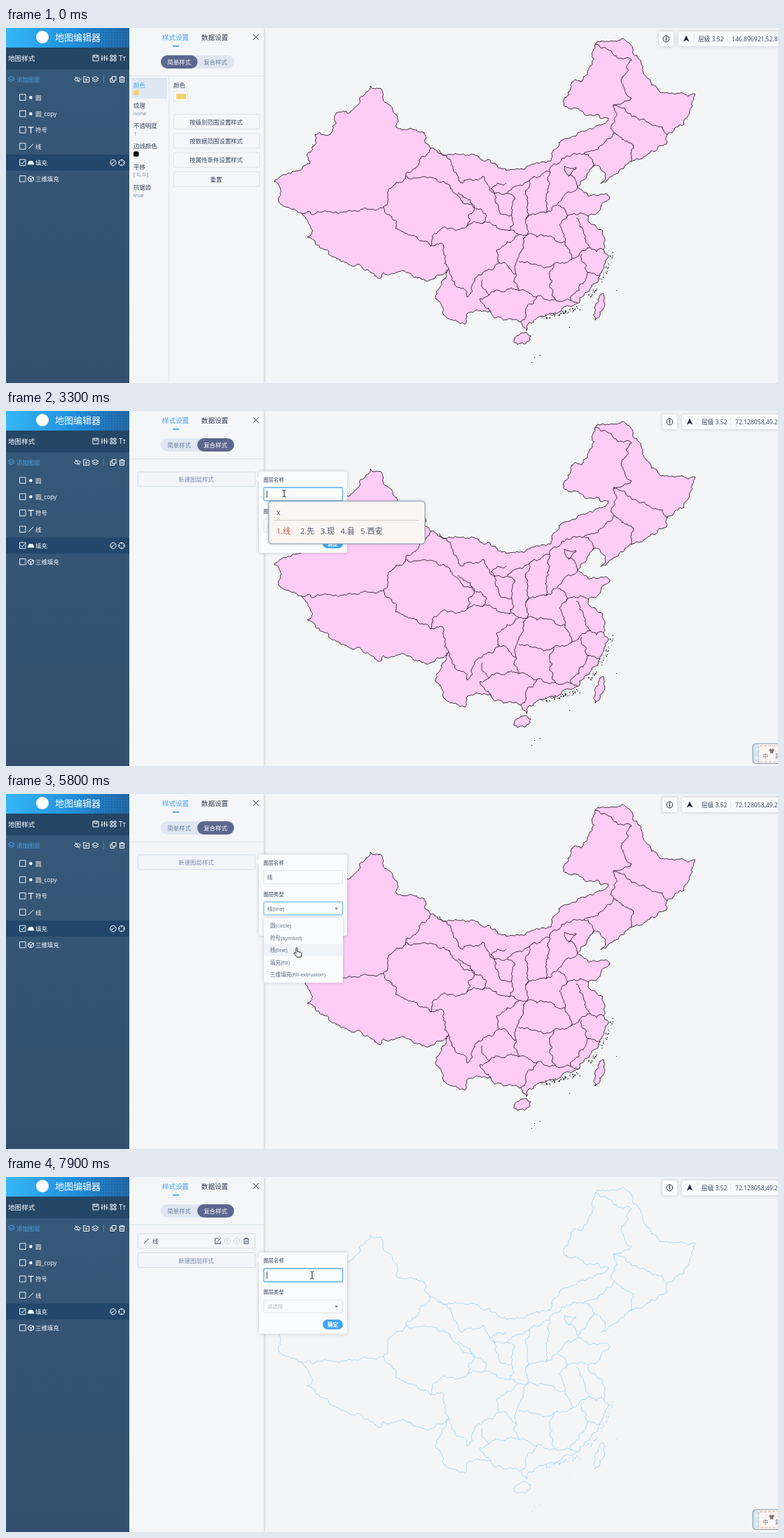
These frames come from a looping animation (1102 by 508 pixels, 8000 ms). An HTML page with a canvas:

```html
<!DOCTYPE html>
<html lang="zh">
<head>
<meta charset="utf-8">
<style>
html, body { margin: 0; width: 100%; height: 100%; overflow: hidden; background: #f4f5f7; }
canvas { display: block; width: 1102px; height: 508px; }
</style>
</head>
<body>
<canvas id="stage" width="1102" height="508"></canvas>
<script>
const c = document.getElementById('stage').getContext('2d');
const FONT = '"Open Sans", "Noto Sans CJK SC", "Noto Sans CJK", sans-serif';
const BLUE = '#42a5f0', INK = '#34435a', SOFT = '#6f7f9f', RULE = '#dbe4ec', PAPER = '#f4f6f9';
const clamp = v => Math.max(0, Math.min(1, v));
const ramp = (t, a, b) => clamp((t - a) / (b - a));

// ---------- map geometry ----------
let seed = 11;
const rand = () => (seed = (seed * 16807) % 2147483647) / 2147483647;

const COAST = [
  383,220, 407,208, 434,194, 437,170, 441,152, 464,150, 472,121, 489,122, 511,96, 520,83, 552,116, 556,140,
  598,153, 606,172, 636,181, 690,188, 714,204, 778,190, 789,164, 821,148, 860,129, 795,105, 807,78, 822,77,
  841,23, 879,15, 903,44, 918,73, 945,93, 983,94, 968,138, 944,152, 943,166, 925,177, 893,191, 849,223,
  855,207, 848,199, 837,199, 816,227, 862,242, 831,269, 855,305, 853,317, 860,327, 848,355, 836,368, 816,394,
  770,412, 746,422, 743,433, 735,420, 710,418, 692,406, 658,409, 655,424, 628,413, 617,390, 632,345, 607,360,
  539,350, 535,358, 494,341, 455,317, 430,299, 438,290, 422,265, 390,242
];
const NORTH = [
  [422,265, 482,263, 539,256],
  [606,172, 573,206, 547,230, 539,256, 556,287, 589,303, 606,312],
  [571,212, 632,224, 668,254, 658,283, 612,294, 606,312, 624,310, 632,345],
  [619,175, 638,199, 652,222, 680,212, 700,236, 726,242, 722,268, 703,258, 692,230, 714,222],
  [645,236, 686,268, 680,280],
  [716,236, 748,217, 776,205, 800,183, 825,180, 868,150],
  [658,283, 680,280, 718,290, 744,296, 742,274],
  [748,217, 742,274, 772,264, 773,230, 776,205],
  [841,23, 874,44, 893,46, 878,74, 893,100, 867,110, 868,150, 893,165, 893,191],
  [867,110, 903,131, 944,152],
  [825,180, 837,199],
  [718,290, 722,268],
  [816,227, 797,198, 814,200, 803,213]
];
const SOUTH = [
  [772,264, 793,246, 816,227],
  [788,254, 800,272, 831,269],
  [744,296, 798,306, 790,282, 800,272],
  [814,272, 826,296, 834,314, 853,317],
  [798,306, 806,332, 834,314],
  [822,324, 832,350, 848,355],
  [832,350, 806,390, 816,394],
  [806,332, 782,338, 776,352, 784,388, 806,390],
  [732,334, 760,340, 782,338],
  [744,296, 732,324, 728,352, 704,336],
  [732,296, 700,318, 704,336, 680,352, 658,385, 632,345],
  [680,360, 690,382, 732,376, 728,352],
  [690,382, 676,388, 692,406],
  [732,376, 758,384, 735,420],
  [758,384, 784,388]
];

// Roughens a straight segment by seeded midpoint displacement.
function rough(path, x0, y0, x1, y1) {
  const dx = x1 - x0, dy = y1 - y0, len = Math.hypot(dx, dy);
  if (len < 3) return path.lineTo(x1, y1);
  const k = (rand() - .5) * (len > 25 ? .22 : .5);
  const mx = (x0 + x1) / 2 - dy * k, my = (y0 + y1) / 2 + dx * k;
  rough(path, x0, y0, mx, my);
  rough(path, mx, my, x1, y1);
}
function trace(path, pts) {
  path.moveTo(pts[0], pts[1]);
  for (let i = 2; i < pts.length; i += 2) rough(path, pts[i - 2], pts[i - 1], pts[i], pts[i + 1]);
}
function island(path, x, y, rx, ry, tilt) {
  const pts = [];
  for (let i = 0; i <= 8; i++) {
    const a = i * Math.PI / 4, u = rx * Math.cos(a), v = ry * Math.sin(a);
    pts.push(x + u * Math.cos(tilt) - v * Math.sin(tilt), y + u * Math.sin(tilt) + v * Math.cos(tilt));
  }
  trace(path, pts);
}
const land = new Path2D(), inner = new Path2D(), specks = [];
trace(land, COAST.concat(COAST.slice(0, 2)));
island(land, 737, 445, 13, 8, -.35);
island(land, 847, 399, 6, 20, .3);
[...NORTH, ...SOUTH].forEach(b => trace(inner, b));
for (let i = 0; i < 85; i++) {
  const k = rand(), east = k < .5;
  const x = east ? 830 + 30 * Math.sin(k * 3.1) : 760 + 110 * (k - .5);
  const y = east ? 382 - 126 * k : 414 - 30 * (k - .5);
  specks.push([x + rand() * 6, y + rand() * 6 - 2, .6 + rand() * 1.2]);
}
specks.push([750, 478, 1], [754, 471, 1], [762, 468, 1], [871, 375, 1], [804, 428, 1]);

function drawMap(lines) {
  const color = lines ? '#a4daf5' : '#171018';
  if (!lines) { c.fillStyle = '#ffccf5'; c.fill(land); }
  c.strokeStyle = color;
  c.lineWidth = lines ? 1 : .85;
  c.lineJoin = 'round';
  c.stroke(land);
  c.stroke(inner);
  c.fillStyle = color;
  specks.forEach(([x, y, s]) => c.fillRect(x, y, s, s));
}

// ---------- drawing helpers ----------
function text(s, x, y, size = 8.45, color = INK, align = 'left', weight = 400) {
  c.font = `${weight} ${size}px ${FONT}`;
  c.fillStyle = color;
  c.textAlign = align;
  c.fillText(s, x, y + size * .36);
}
function rect(x, y, w, h, fill, stroke, r = 0, lw = 1) {
  c.beginPath();
  c.roundRect(x, y, w, h, r);
  if (fill) { c.fillStyle = fill; c.fill(); }
  if (stroke) { c.strokeStyle = stroke; c.lineWidth = lw; c.stroke(); }
}
function disc(x, y, r, fill, stroke) {
  rect(x - r, y - r, 2 * r, 2 * r, fill, stroke, r);
}
function icon(d, x, y, color = '#fff', fill, lw = 1) {
  const p = new Path2D(d);
  c.save();
  c.translate(x, y);
  c.lineWidth = lw;
  c.strokeStyle = color;
  if (fill) { c.fillStyle = fill; c.fill(p); }
  c.stroke(p);
  c.restore();
}
function card(x, y, w, h, r = 2) {
  c.save();
  c.shadowColor = 'rgba(50,60,80,.28)';
  c.shadowBlur = 5;
  rect(x, y, w, h, '#fafbfc', null, r);
  c.restore();
}

const square = (x, y, s) => `M${x} ${y}h${s}v${s}h${-s}z`;
const SAVE = square(-4, -4, 8) + 'M-2-4v3h4v-3';
const SLIDERS = [-3.5, 0, 3.5].map((x, i) => `M${x}-4v8M${x - 1.5} ${i % 2 ? -1 : 1}h3`).join('');
const GRID = [-4, 1].map(x => square(x, -4, 3) + square(x, 1, 3)).join('');
const LAYERS = 'M0-4l4.5 2.5l-4.5 2.5l-4.5-2.5zM-4.5 1l4.5 2.7l4.5-2.7';
const EYE = 'M-4.5 0q4.5-5 9 0q-4.5 5-9 0M-3-4l6 8';
const FOLDER = 'M-4-4h3l1 1h4v7h-8zM-2 .5h4m-2-2v4';
const COPY = square(-1.5, -4, 5.5) + 'M-1.5-1.5H-4V4h5.5v-2.5';
const TRASH = 'M-4-2.7h8m-5.5 0v-1.3h3v1.3M-3-2.7v6.7h6v-6.7M-1-.7v3m2 0v-3';
const CUBE = 'M0-4l4 2v4l-4 2l-4-2v-4zM-4-2l4 2l4-2M0 0v4';
const EDIT = 'M1-3.5h-5v7.5h7.7v-4M-1 1l5-5';
const SLASH = 'M-3.5 3.5l7-7';
const CURSORS = {
  arrow: 'M0 0v14l3.3-3l2.2 5l2.5-1l-2.2-5h4.2z',
  hand: 'M0 0q1.2-1.2 2 .3v4.7l5 1.3q1.4.7 1 2.7l-1 4h-5.8l-4.2-5.2q.4-1.8 1.7-1l1.3 1.2z',
  beam: 'M-2.5-5q2.5 0 2.5 1q0-1 2.5-1M0-4v8M-2.5 5q2.5 0 2.5-1q0 1 2.5 1'
};

// ---------- fixed interface ----------
function drawSidebar() {
  let g = c.createLinearGradient(0, 59, 0, 508);
  g.addColorStop(0, '#365878');
  g.addColorStop(1, '#334f6d');
  rect(0, 0, 176, 508, g);
  g = c.createLinearGradient(0, 0, 176, 8);
  g.addColorStop(0, '#36b7f9');
  g.addColorStop(.55, '#218fdc');
  g.addColorStop(1, '#2469a6');
  rect(0, 0, 176, 28, g);
  c.fillStyle = 'rgba(10,50,110,.3)';
  for (let y = 2; y < 28; y += 4)
    for (let x = 100 + y; x < 176; x += 4) c.fillRect(x, y, 1.6, 1.6);
  disc(52, 13, 9, '#fff');
  text('地图编辑器', 70, 13.5, 13, '#fff');

  rect(0, 28, 176, 31, '#254665');
  text('地图样式', 3, 43.5, 9.6, '#fff');
  [SAVE, SLIDERS, GRID].forEach((d, i) => icon(d, 128 + i * 12.5, 43));
  text('Tт', 161, 43.5, 10, '#fff');

  icon(LAYERS, 7.5, 73, BLUE);
  text('添加图层', 15, 74, 8.45, BLUE);
  [EYE, FOLDER, LAYERS].forEach((d, i) => icon(d, 102 + i * 12.7, 73.5));
  rect(139, 68, .7, 11, '#7b91a8');
  icon(COPY, 153, 73.5);
  icon(TRASH, 165.5, 73.5);

  rect(0, 181, 176, 23, '#22476b');
  ['圆', '圆_copy', '符号', '线', '填充', '三维填充'].forEach((name, i) => {
    const y = 99.5 + i * 23.3;
    rect(19.5, y - 4.5, 8.5, 8.5, null, '#e8eef4');
    text(name, 42, y + .3, 8.45, '#fff');
    if (i < 2) disc(35.3, y, 2.3, '#fff');
    if (i === 2) icon('M-4-4h8m-4 0v8.5', 35.5, y, '#fff', null, 1.3);
    if (i === 3) icon(SLASH, 35.5, y);
    if (i === 4) {
      icon('M-2.5-2h5l1.8 4.3h-8.6z', 35.5, y, '#fff', '#fff');
      icon('M-2.5 0l2 2l3.5-4.5', 23.7, y - .3);
      disc(153, y, 4.2, null, '#fff');
      icon('M-2 2l4-4M-2 2v-2', 153, y);
      disc(165, y, 4.2, null, '#fff');
      icon('M-4 0h2m4 0h2M0-4v2m0 4v2', 165, y);
    }
    if (i === 5) icon(CUBE, 35.5, y);
  });
}

function drawToolbar(lng, lat) {
  const dx = lng < 100 ? 5 : 0;
  card(932 + dx, 5, 21, 21);
  disc(942.3 + dx, 15.5, 4.4, null, '#222');
  text('i', 942.3 + dx, 15.5, 8, '#222', 'center', 700);
  card(960 + dx, 5, 160, 21);
  icon('M0-4l3.7 8l-3.7-2l-3.7 2z', 971 + dx, 15, '#1c2430', '#1c2430', .5);
  rect(981.5 + dx, 9, .8, 12, '#dde1e6');
  text('层级 3.52', 988 + dx, 15.5, 8.6);
  rect(1029 + dx, 9, .8, 12, '#dde1e6');
  text(`${lng.toFixed(6)},${lat.toFixed(6)}`, 1036 + dx, 15.5, 8.6);
}

function drawPanel(t) {
  c.save();
  c.shadowColor = 'rgba(60,70,80,.4)';
  c.shadowBlur = 4;
  rect(176, 0, 192, 508, PAPER);
  c.restore();
  text('样式设置', 242, 13.5, 9.6, BLUE, 'center');
  rect(238, 25, 9, 1.8, BLUE);
  text('数据设置', 298, 13.5, 9.6, '#2c3a4d', 'center');
  icon('M-4-4l8 8m0-8l-8 8', 356.7, 13, '#1e2632');
  const complex = t >= 1400;
  rect(221, 39, 105, 19, '#dfe6f2', null, 9.5);
  rect(complex ? 273 : 221, 39, 52.5, 19, '#5c678f', null, 9.5);
  text('简单样式', 247, 48.7, 8.45, complex ? SOFT : '#fff', 'center');
  text('复合样式', 299, 48.7, 8.45, complex ? '#fff' : SOFT, 'center');
  rect(176, 68, 192, 1, RULE);
  if (complex) drawComplex(t); else drawSimple();
}

function drawSimple() {
  rect(232, 69, 1, 439, RULE);
  rect(179, 71, 51, 30, '#dfe7f3');
  [['颜色'], ['纹理', 'none'], ['不透明度', '1'], ['边线颜色'], ['平移', '[ 0, 0 ]'], ['抗锯齿', 'true']]
    .forEach(([name, value], i) => {
      const y = 81.5 + i * 29.3;
      text(name, 182, y, 8.45, i ? INK : BLUE);
      if (value) text(value, 182, y + 11, 7.6, SOFT);
    });
  rect(182, 88.5, 7.5, 7.5, '#f4d06f', null, 2);
  rect(182, 176.5, 7.5, 7.5, '#000', null, 2);
  text('颜色', 239, 81.5);
  rect(239.5, 90.5, 20, 14, '#fff', '#dce3ea', 1);
  rect(243, 94, 14, 8, '#f4d06f');
  ['按级别范围设置样式', '按数据范围设置样式', '按属性条件设置样式', '重置'].forEach((name, i) => {
    const y = 123.5 + i * 27.4;
    rect(239.5, y, 122, 21, '#f5f7fa', RULE, 1);
    text(name, 300, y + 11, 8.45, INK, 'center');
  });
}

function drawComplex(t) {
  const added = t >= 6500, y = added ? 108.5 : 87;
  if (added) {
    rect(188.5, 81, 167, 21, PAPER, '#d5dfea', 1);
    icon(SLASH, 200.5, 91.5, '#465670');
    text('线', 209, 92);
    icon(EDIT, 302.5, 91.5, '#465670');
    [-1, 1].forEach(dir => {
      const x = 322.8 + dir * 6.8;
      disc(x, 91.5, 4.2, null, '#cfd6df');
      icon(`M0-2v4M-2 0L0 ${2 * dir}L2 0`, x, 91.5, '#cfd6df');
    });
    icon(TRASH, 343, 91.5, '#465670');
  }
  const hover = (t >= 1700 && t < 2200) || (t >= 7000 && t < 7500);
  rect(188.5, y, 167, 21, hover ? '#edf5fd' : '#f3f5fa', hover ? '#8ec8f6' : '#d3dcea', 1);
  text('新建图层样式', 271.5, y + 11, 8.45, hover ? BLUE : '#7b8ab0', 'center');
}

// ---------- layer dialog ----------
function dialogAlpha(t) {
  if (t < 6500) return ramp(t, 1900, 2200);
  return t < 7200 ? .88 * (1 - ramp(t, 6500, 6700)) : ramp(t, 7200, 7500);
}

function drawDialog(t) {
  const alpha = dialogAlpha(t);
  if (!alpha) return;
  const fresh = t >= 7200;
  const focused = (t >= 2500 && t < 4600) || t >= 7700;
  const named = t >= 3800 && !fresh;
  const selected = t >= 5800 && !fresh;
  const active = t >= 4600 && !fresh;
  const caret = focused && !(t >= 3000 && t < 3300);
  const open = ramp(t, 4600, 5000) * (1 - ramp(t, 5800, 6100));
  c.save();
  c.globalAlpha = alpha;
  c.translate(0, t >= 6500 ? 21.5 : 0);
  card(361, 86.5, 126, 116.5, 3);
  icon('M0-4l-3.5 4l3.5 4z', 361, 97, '#fafbfc', '#fafbfc', .3);
  text('图层名称', 367.5, 98, 7.3);
  rect(368, 109.5, 112.5, 19, '#fafbfc', focused ? '#58aef3' : '#dfe3e8', 1.5, focused ? 1.3 : 1);
  if (named) text('线', 372.5, 119.3, 8, '#596579');
  if (caret) rect(named ? 380 : 372, 114, .9, 10, '#333');
  text('图层类型', 367.5, 143, 7.3);
  rect(368, 154.5, 112.5, 18.5, '#fafbfc', active ? '#58aef3' : '#dfe3e8', 1.5);
  text(selected ? '线(line)' : '请选择', 373, 164, 7.4, selected ? '#596579' : '#b9bec6');
  icon(active && !selected ? 'M-2 1h4l-2-2.2z' : 'M-2-1h4l-2 2.2z', 471.7, 164, '#777', '#777', .5);
  rect(452, 182.5, 29, 14, BLUE, null, 7);
  text('确定', 466.5, 189.8, 7.6, '#fff', 'center', 700);
  if (open) drawOptions(t, open);
  c.restore();
}

function drawOptions(t, open) {
  c.save();
  c.globalAlpha = Math.min(.94 + .06 * ramp(t, 4900, 5000), open * 1.3);
  c.translate(0, 177);
  c.scale(1, .6 + .4 * Math.min(1, open * 1.34));
  card(368, 0, 113, 93, 2);
  const [, y] = pointer(t);
  ['圆(circle)', '符号(symbol)', '线(line)', '填充(fill)', '三维填充(fill-extrusion)'].forEach((name, i) => {
    const row = 11.3 + i * 17.6;
    if (t >= 5000 && Math.abs(y - 177 - row) < 8.8) rect(368, row - 8.8, 113, 17.6, '#eef3f9');
    text(name, 377, row, 7.6, '#596579');
  });
  c.restore();
}

// ---------- input method ----------
function drawIme(t) {
  if ((t >= 2600 && t < 4600) || t >= 7800) {
    rect(1066, 476, 60, 28.5, '#f8f5f2', '#8298a8', 5, 1.2);
    rect(1067, 477, 8, 26.5, '#cfe9f4', null, 4);
    icon('M0 0l-5 6l5 5l-5 6l5 6', 1076, 479, '#e8f5fa', null, 1.4);
    c.setLineDash([4, 2]);
    rect(1074, 479, 60, 23, null, '#d99b90', 2, .9);
    c.setLineDash([]);
    icon('M-2-3l2 1l2-1l2 2l-2 1v3h-4v-3l-2-1z', 1093, 486.5, '#8a6c72', '#8a6c72', .5);
    text('中', 1080, 494.5, 8, '#6b6f80');
    text('简', 1098, 494.5, 8, '#6b6f80');
  }
  if (t >= 3300 && t < 3800) {
    const typed = 'xian'.slice(0, Math.floor((t - 3200) / 100));
    card(375, 129, 223, 61, 4);
    rect(375, 129, 223, 61, '#f8f5f2', '#8298a8', 4);
    text(typed, 386, 145, 11, '#4a5266');
    rect(382, 156, 208, 1, '#d9cfc9');
    text('1.线', 386, 172, 11, '#c75a4c');
    text('2.先   3.现   4.县   5.西安', 420, 172, 11, '#4a5266');
  }
}

// ---------- pointer ----------
const MOVES = [
  [300, 1088, 30, 'arrow'], [600, 800, 52, 'arrow'], [900, 369, 78, 'arrow'],
  [1100, 314, 49, 'hand'], [1400, 301, 48, 'hand'], [1700, 288, 98, 'hand'], [2000, 290, 100, 'hand'],
  [2200, 373.5, 111.5, 'beam'], [2500, 397, 118, 'beam'], [4100, 397, 118, 'beam'],
  [4400, 412, 162, 'hand'], [4600, 416, 163, 'hand'], [4900, 420, 190, 'hand'], [5200, 420, 190, 'hand'],
  [5600, 410, 222, 'hand'], [6100, 420, 218, 'hand'], [6400, 464.5, 185, 'hand'], [6500, 429.5, 181, 'hand'],
  [6700, 350, 140, 'arrow'], [7000, 290, 118, 'hand'], [7300, 288, 119, 'hand'],
  [7700, 425, 141, 'beam'], [7900, 437, 140.5, 'beam']
];
function pointer(t) {
  const i = MOVES.findLastIndex(m => m[0] <= t), a = MOVES[i], b = MOVES[i + 1];
  if (!b) return a.slice(1);
  const k = ramp(t, a[0], b[0]);
  return [a[1] + (b[1] - a[1]) * k, a[2] + (b[2] - a[2]) * k, a[3]];
}
function drawPointer(t) {
  if (t < 300) return;
  const [x, y, kind] = pointer(t);
  icon(CURSORS[kind], x, y, '#222', kind === 'beam' ? null : '#fff');
}

function draw(t) {
  c.fillStyle = '#f4f5f7';
  c.fillRect(0, 0, 1102, 508);
  drawMap(t >= 6500);
  const [x, y] = t < 300 ? [1099, 22] : pointer(Math.min(t, 900));
  drawToolbar(72.128058 + (x - 369) * .1024231, 49.212847 + (78 - y) * .0645);
  drawPanel(t);
  drawSidebar();
  drawDialog(t);
  drawIme(t);
  drawPointer(t);
}

const start = performance.now();
function tick() {
  const t = (performance.now() - start) % 8000;
  draw(Math.floor(t / 100) * 100);
  requestAnimationFrame(tick);
}
tick();
</script>
</body>
</html>
```
